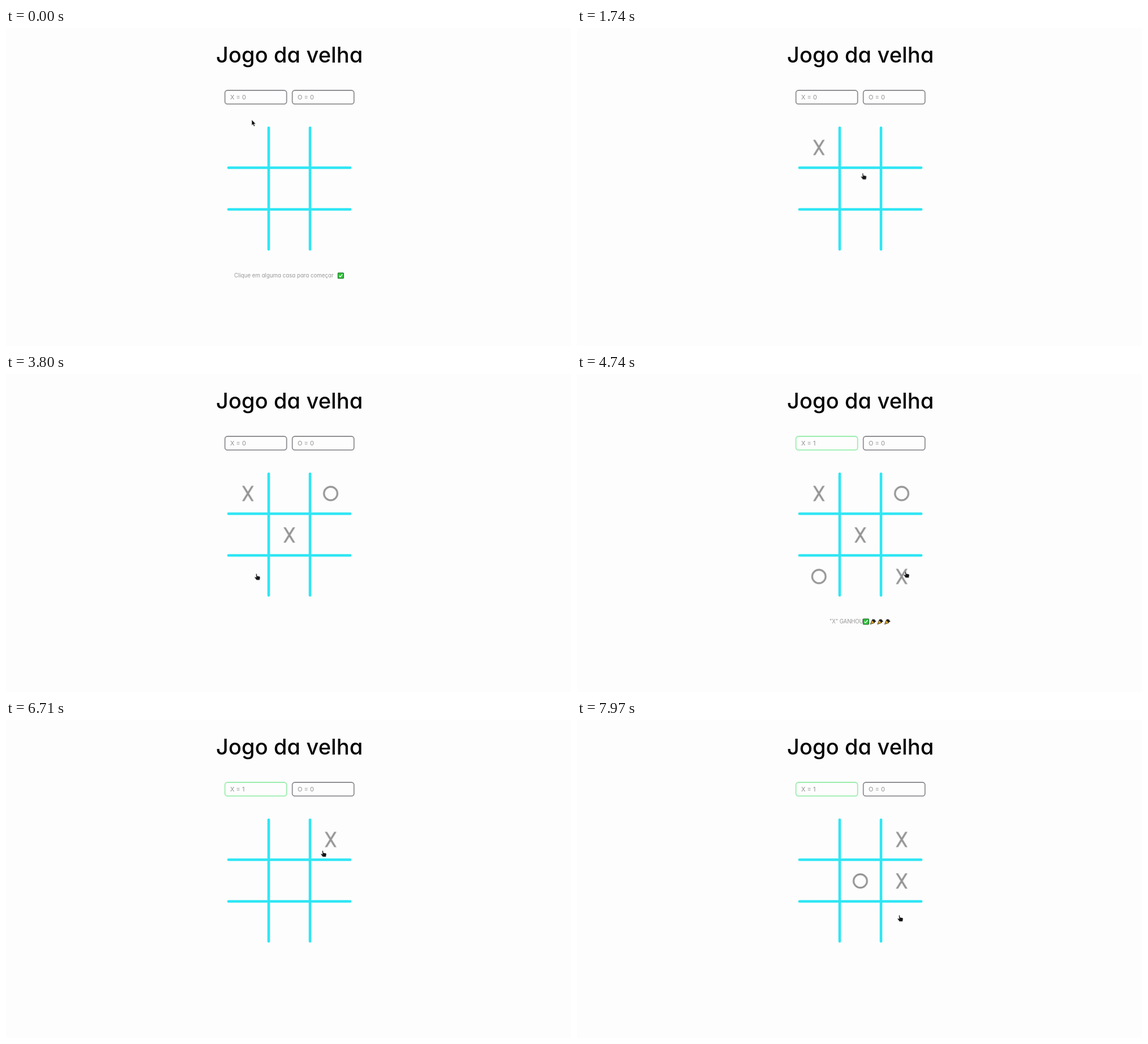
Animation of 998x561 px, one loop 8000 ms. Source, as an HTML page:

```html
<!DOCTYPE html>
<html lang="pt-BR">
<head>
<meta charset="utf-8">
<title>Jogo da velha</title>
<style>
html, body { margin: 0; width: 100%; height: 100%; overflow: hidden; background: #fdfdfd; }
svg { display: block; width: 100%; height: 100%; }
text { font-family: Inter, "Open Sans", sans-serif; font-feature-settings: "cv11"; fill: #8e8e8e; }
.title { font-size: 38px; font-weight: 500; letter-spacing: .1px; text-anchor: middle; fill: #050505; }
.score { font-size: 11px; }
.note { font-size: 9.7px; fill: #979797; }
.box { fill: none; stroke: #8f8f94; stroke-width: 1.8; }
.win-box { stroke: #9bedae; }
.grid { fill: none; stroke: #2ee6f4; stroke-width: 4.6; stroke-linecap: round; }
.marks { fill: #949494; }
.ring { fill: none; stroke: #949494; stroke-width: 3.1; }

/* Hard switches */
.marks use, .state { opacity: 0; animation: 8s step-end infinite; }
.intro { animation-name: intro !important; }
.before { animation-name: before !important; }
.after { animation-name: after !important; }
.result { animation-name: result !important; }
.marks .m1 { animation-name: m1; }
.marks .m2 { animation-name: m2; }
.marks .m3 { animation-name: m3; }
.marks .m4 { animation-name: m4; }
.marks .m5 { animation-name: result; }
.marks .n1 { animation-name: n1; }
.marks .n2 { animation-name: n2; }
.marks .n3 { animation-name: n3; }
@keyframes intro { 0% { opacity: 1 } 11.5% { opacity: 0 } }
@keyframes before { 0% { opacity: 1 } 57% { opacity: 0 } }
@keyframes after { 0% { opacity: 0 } 57%, 100% { opacity: 1 } }
@keyframes result { 0% { opacity: 0 } 57% { opacity: 1 } 70% { opacity: 0 } }
@keyframes m1 { 0% { opacity: 0 } 11.5% { opacity: 1 } 70% { opacity: 0 } }
@keyframes m2 { 0% { opacity: 0 } 27% { opacity: 1 } 70% { opacity: 0 } }
@keyframes m3 { 0% { opacity: 0 } 34.5% { opacity: 1 } 70% { opacity: 0 } }
@keyframes m4 { 0% { opacity: 0 } 49.5% { opacity: 1 } 70% { opacity: 0 } }
@keyframes n1 { 0% { opacity: 0 } 78.5%, 100% { opacity: 1 } }
@keyframes n2 { 0% { opacity: 0 } 89.5%, 100% { opacity: 1 } }
@keyframes n3 { 0% { opacity: 0 } 96.5%, 100% { opacity: 1 } }

/* Pointer: arrow above the board, hand over its cells */
.pointer { animation: travel 8s ease-in-out infinite; }
.arrow { animation: arrow 8s step-end infinite; }
.hand { animation: hand 8s step-end infinite; }
@keyframes arrow { 0% { opacity: 1 } 3% { opacity: 0 } }
@keyframes hand { 0% { opacity: 0 } 3%, 100% { opacity: 1 } }
@keyframes travel {
  0%, .5% { transform: translate(437px, 168px) }
  7%, 16% { transform: translate(435px, 214px) }
  21.75% { transform: translate(506px, 262px); animation-timing-function: ease-out }
  26%, 28.5% { transform: translate(574px, 219px) }
  33.5%, 35% { transform: translate(511px, 292px) }
  37%, 42% { transform: translate(517px, 315px) }
  47.5% { transform: translate(444px, 358px); animation-timing-function: ease-out }
  49%, 51% { transform: translate(437px, 359px) }
  56.5%, 66% { transform: translate(582px, 354px) }
  77%, 80.5% { transform: translate(568px, 214px) }
  83.9% { transform: translate(561px, 236px); animation-timing-function: ease-out }
  88.5%, 91.5% { transform: translate(510px, 289px) }
  93.9% { transform: translate(536px, 270px) }
  96%, 97% { transform: translate(573px, 288px) }
  99.5%, 100% { transform: translate(571px, 350px) }
}
</style>
</head>
<body>
<svg viewBox="0 0 998 561">
  <defs>
    <path id="x" d="M-10.3-13.5h4L10.3 13.5h-4zM6.3-13.5h4L-6.3 13.5h-4z"/>
    <circle id="o" class="ring" r="11.9"/>
    <g id="check">
      <rect x=".5" y=".5" width="10" height="9.8" rx=".6" fill="#2fc33b" stroke="#176023"/>
      <path d="M2.7 5.5l2 2 3.8-4.7" fill="none" stroke="#fff" stroke-width="1.3"/>
    </g>
    <g id="popper">
      <path d="M.6 10.2L3.3 3.2 7.8 7.6z" fill="#efb832" stroke="#30240f" stroke-width=".8"/>
      <path d="M3.3 3.2L5 .8 6.5 2 8.2 1.2 8.8 3.2 11 4.9 9.2 6 7.8 7.8z" fill="#22201f"/>
      <path d="M2.2 6.3l2.4 2.3" stroke="#60451a" stroke-width=".7"/>
    </g>
  </defs>

  <text class="title" x="500.7" y="60.5">Jogo da velha</text>

  <rect class="box state before" x="386.7" y="110" width="109" height="24.2" rx="4.5"/>
  <rect class="box win-box state after" x="386.7" y="110" width="109" height="24.2" rx="4.5"/>
  <rect class="box" x="505.7" y="110" width="109" height="24.2" rx="4.5"/>
  <text class="score state before" x="396" y="126">X = 0</text>
  <text class="score state after" x="396" y="126">X = 1</text>
  <text class="score" x="515" y="126">O = 0</text>

  <path class="grid" d="M464 176V390.5M537 176V390.5M393 246.5H608M393 320H608"/>

  <g class="marks">
    <use class="m1" href="#x" x="427.3" y="210.8"/>
    <use class="m2" href="#o" x="573.5" y="210.8"/>
    <use class="m3" href="#x" x="500.4" y="284"/>
    <use class="m4" href="#o" x="427.3" y="357.2"/>
    <use class="m5" href="#x" x="573.5" y="357.2"/>
    <use class="n1" href="#x" x="573.5" y="210.8"/>
    <use class="n2" href="#o" x="500.4" y="284"/>
    <use class="n3" href="#x" x="573.5" y="284"/>
  </g>

  <g class="state intro">
    <text class="note" x="403" y="440">Clique em alguma casa para começar</text>
    <use href="#check" x="585.8" y="431.5"/>
  </g>
  <g class="state result">
    <text class="note" x="446" y="440" letter-spacing="-.15">"X" GANHOU!</text>
    <use href="#check" x="504.9" y="431.5"/>
    <use href="#popper" x="517.6" y="431.3"/>
    <use href="#popper" x="530.2" y="431.3"/>
    <use href="#popper" x="542.8" y="431.3"/>
  </g>

  <g class="pointer">
    <path class="arrow" d="M-3-6.2V4L-.7 1.9.8 5.6 2.7 4.8 1.2 1.2H4.2z" fill="#111" stroke="#fff" stroke-width=".6"/>
    <path class="hand" d="M-2.6-5.2Q-1.7-6.4-.8-5.2L-.3-1.8 3.8-1Q5.2-.6 5 .9L4.2 5.4H-1.4L-4.8 1.1Q-5-.5-3.6-.1L-2 1z" fill="#141418" stroke="#fff" stroke-width=".5"/>
  </g>
</svg>
</body>
</html>
```
